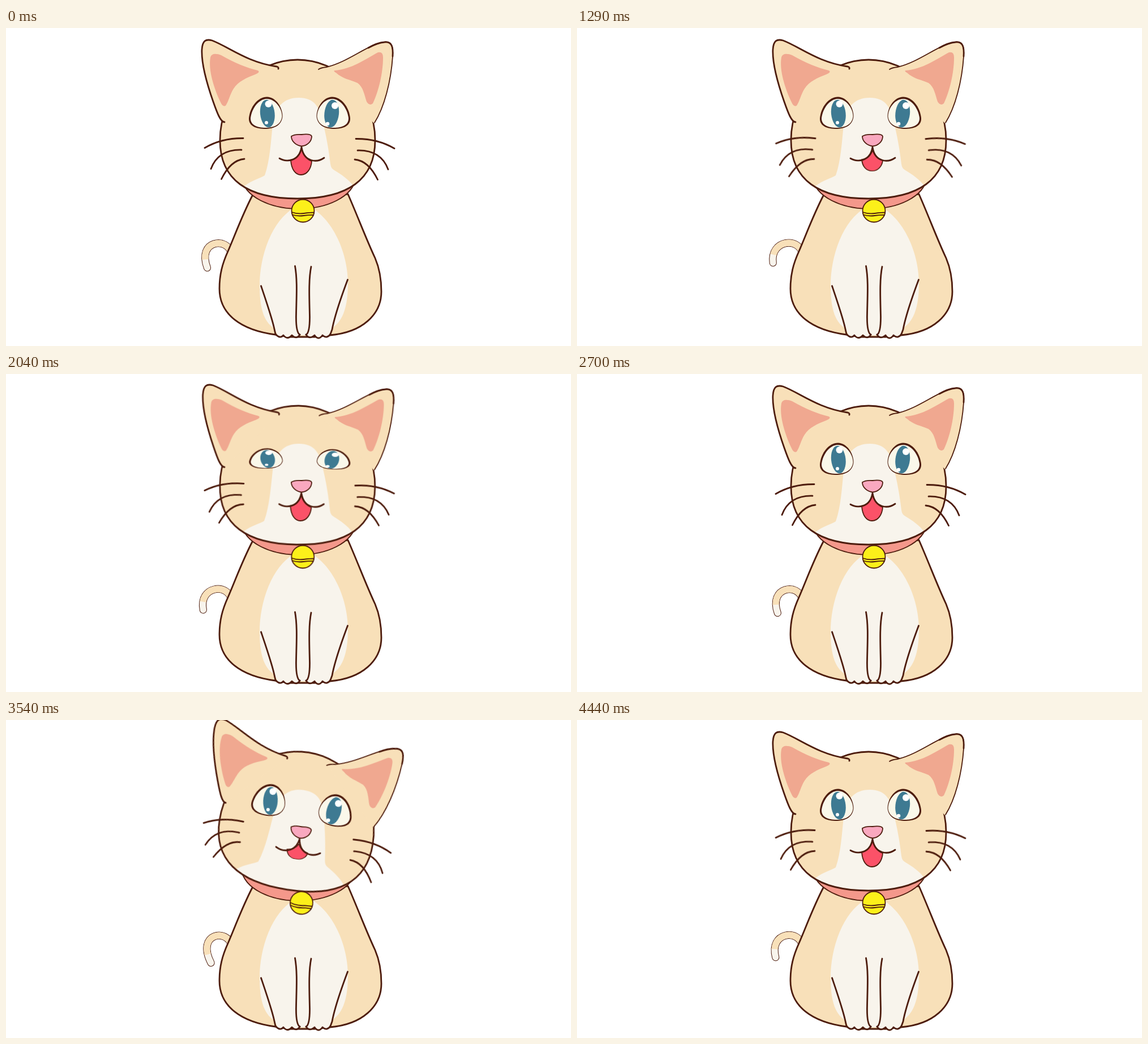
Recreate the animation shown at these times as an HTML page. Size 998 by 561 pixels, loop 4500 ms.

```html
<!DOCTYPE html>
<html lang="en">
<head>
<meta charset="utf-8">
<title>Sitting cat</title>
<style>
html, body { margin: 0; width: 100%; height: 100%; overflow: hidden; background: #fff; }
svg { display: block; width: 998px; height: 561px; }

.line, .edge { stroke: #4d1c0d; stroke-width: 2.8; stroke-linecap: round; stroke-linejoin: round; }
.line { fill: none; }
.thin { stroke-width: 1.8; }
.fur { fill: #f8e0b9; }
.white { fill: #f8f4ec; }
.pink { fill: #f0a890; }

.tilt, .blink, .lick, .flap, .tail path { animation: 4.5s linear infinite paused; }
.tilt { animation-name: tilt; animation-timing-function: cubic-bezier(.35, .2, .65, .8); }
.skull { transform-origin: 517px 182px; }
.ears { transform-origin: 514px 170px; }
.eyes { transform-origin: 518px 181px; }
.muzzle { transform-origin: 520px 188px; }
.bell { transform-origin: 522px 306px; }
.blink { animation-name: blink; transform-origin: 518.5px 150px; }
.lick { animation-name: lick; animation-timing-function: ease-in-out; transform-origin: 522px 228px; }
.flap { animation-name: flap; animation-duration: .3s; animation-timing-function: ease-in-out; transform-origin: 418px 213px; }
.tail path { animation-name: sway; animation-timing-function: ease-in-out; fill: none; }

@keyframes tilt {
  0%, .4%, 13.3%, 33.1%, 46%, 73.4%, 86.3%, 100% { transform: rotate(0deg); }
  6.9% { transform: rotate(-10.3deg); }
  39.6%, 79.8% { transform: rotate(10.3deg); }
}
@keyframes blink {
  0%, 4.5%, 15.5%, 43.3%, 54.4%, 84.5%, 95.5%, 100% { transform: scaleY(1); }
  10%, 48.9%, 90% { transform: scaleY(.005); }
}
@keyframes lick {
  0%, 20%, 31.5%, 73%, 84%, 100% { transform: scaleY(1); }
  26%, 78.7% { transform: scaleY(.58); }
}
@keyframes flap {
  0%, 100% { transform: rotate(0deg); }
  50% { transform: rotate(10deg); }
}
@keyframes sway {
  0%, 100% { d: path("M398 398C392 368 337 374 355.5 423"); }
  5.1%, 18.9%, 38.7%, 56.9%, 68.7%, 80%, 92.2% { d: path("M398 398C392 367 334 376 365 431"); }
  10%, 27.8%, 47.5%, 62.7%, 75.1%, 86.7%, 97.3% { d: path("M398 398C392 368 341 374 346 414"); }
}
</style>
</head>
<body>
<svg viewBox="0 0 998 561">
  <defs>
    <g id="whiskers" class="line">
      <path d="M419 194.500Q381 194 351 211.500"/>
      <path d="M416 215Q375 214 362 248.500"/>
      <path d="M421 231Q397 233 380.500 266.500"/>
    </g>
    <!-- The lid line is the rim left between two shapes. -->
    <g id="eye">
      <path fill="#4d1c0d" d="M429 159C431 139 445 121.500 461 121.500C477 122 488.500 140 488.500 156C487 171 475 178 456 178C438 177.500 428.500 171 429 159Z"/>
      <path fill="#faf8ea" d="M432 159C434 142 446 125.500 460.500 125C475 125 487.500 141 487.500 156C486 170 474 176.500 456 176C440 175.500 431.500 169 432 159Z"/>
      <ellipse cx="461.800" cy="151" rx="12.800" ry="24.500" fill="#3e7a92" transform="rotate(-6 461.800 151)"/>
    </g>
  </defs>

  <g class="tail">
    <path stroke="#4d1c0d" stroke-width="13.200" stroke-linecap="round"/>
    <path stroke="#f8f4ec" stroke-width="11.200" stroke-linecap="round"/>
    <path stroke="#f8e0b9" stroke-width="11.200" pathLength="100" stroke-dasharray="83 100"/>
  </g>

  <path class="fur edge" d="M436 294C418 328 405 364 392 394C382 416 377 435 377 460C377 505 415 533 476 541L500 545H545L572 542C630 537 663 505 663 465C663 440 658 420 652 406C636 372 622 334 604 293Z"/>
  <path class="white" d="M525 310C475 325 448 395 448 455C448 500 458 520 474 530L480 542H570L578 528C596 515 604 490 604 450C604 395 575 328 525 310Z"/>
  <g class="line">
    <path class="white" d="M476 540Q484 549 490 542Q497 551 505 542Q513 550 519 541"/>
    <path class="white" d="M530 541Q536 550 545 542Q552 552 559 542Q567 549 573 540"/>
    <path d="M450.500 455C460 483 470 512 474 531L476 540"/>
    <path d="M510.500 420C515 445 513 475 512.500 505C512 525 514 538 519 541"/>
    <path d="M539 421C534 445 536 480 536.500 510C536.500 530 534 539 530 541"/>
    <path d="M603.500 444C590 480 580 510 576 532L573 540"/>
  </g>

  <path class="edge thin" fill="#f4988b" d="M415 262C421 300 470 319 517 319C564 319 613 300 619 262Z"/>

  <g class="tilt skull">
    <path class="fur" d="M378 198C378 115 445 56 515 56S652 115 652 198C652 268 603 301 515 301S378 268 378 198Z"/>
    <path class="white" d="M517 123C545 123 553 140 558 160C566 190 570 215 573 240Q574 248 580 251C592 258 605 267 614 279C590 296 550 301 517 301C480 301 445 296 421 279C435 268 450 265 457 260C466 235 468 200 471 170C475 140 490 123 517 123Z"/>
    <path class="line" d="M378 198C378 115 445 56 515 56S652 115 652 198C652 268 603 301 515 301S378 268 378 198Z"/>
  </g>

  <g class="tilt ears">
    <path class="fur" d="M386 167C377 164 373 150 366 130C352 90 345 60 346 38C347 22 353 19 364 22C395 34 425 60 482 70Z"/>
    <path class="line" d="M386 166C379 166 373 150 366 130C352 90 345 60 346 38C347 22 353 19 364 22C395 34 425 60 478 68Q482 69 481 72"/>
    <path class="pink" d="M361 52C363 44 372 45 380 48C405 62 425 70 445 75Q450 78 440 82C425 88 410 94 402 107C396 116 393 130 388 137Q383 140 379 131C368 108 357 75 361 52Z"/>
    <path class="fur" d="M552 73C600 64 640 28 668 25C682 23 684 34 683 50C680 95 668 140 650 168Z"/>
    <path class="line thin" d="M552 73Q556 70 566 69C605 60 640 28 668 25C682 23 684 34 683 50C680 95 668 140 651 167"/>
    <path class="line" d="M640 35Q656 26 668 25C682 23 684 34 683 50"/>
    <path class="pink" d="M580 75C610 73 635 55 657 43Q666 41 666 52C666 80 658 112 648 133Q642 138 637 130C633 118 631 104 621 97C608 91 595 90 583 79Q578 76 580 75Z"/>
  </g>

  <g class="tilt eyes">
    <g class="blink">
      <use href="#eye"/>
      <use href="#eye" transform="matrix(-1 0 0 1 1037 0)"/>
      <g fill="#fff">
        <circle cx="463.500" cy="134" r="6"/>
        <circle cx="460" cy="167" r="3"/>
        <circle cx="581" cy="137" r="6"/>
        <circle cx="568" cy="169" r="3.300"/>
      </g>
    </g>
  </g>

  <g class="tilt skull">
    <g class="flap"><use href="#whiskers"/></g>
    <g transform="matrix(-1 0 0 1 1037 1)"><g class="flap"><use href="#whiskers"/></g></g>
  </g>

  <g class="tilt muzzle">
    <path class="lick edge thin" fill="#fb5268" d="M522 212C518 228 510 232 503 233C504 249 511 259 521 259C532 259 539 248 540 235C532 232 526 226 522 212Z"/>
    <path class="line" d="M483 230C495 237 518 236 522 210C526 237 549 238 562 229"/>
    <path class="edge thin" fill="#f9a8bf" d="M504 191Q510 187 522 188Q538 186 540 191C540 200 532 208 522 208.500C511 207 504 199 504 191Z"/>
  </g>

  <g class="tilt bell">
    <circle class="edge thin" cx="524.500" cy="322.500" r="20" fill="#fcf01a"/>
    <path class="line thin" d="M505 325Q515 328.500 526 327T544 325.500M506 329.500Q515 332.500 526 331T543 330"/>
  </g>
</svg>
<script>
const LOOP = 4500, BEAT = 450;
const parts = document.getAnimations();
const start = performance.now();

// Each beat holds four long steps, one short, then three long.
function snap(t) {
  const k = t % BEAT;
  const from = k < 270 ? 0 : 270;
  return t - k + from + Math.floor((k - from) / 60) * 60;
}

function draw() {
  const t = snap((performance.now() - start) % LOOP);
  for (const part of parts) part.currentTime = t;
  requestAnimationFrame(draw);
}
draw();
</script>
</body>
</html>
```
